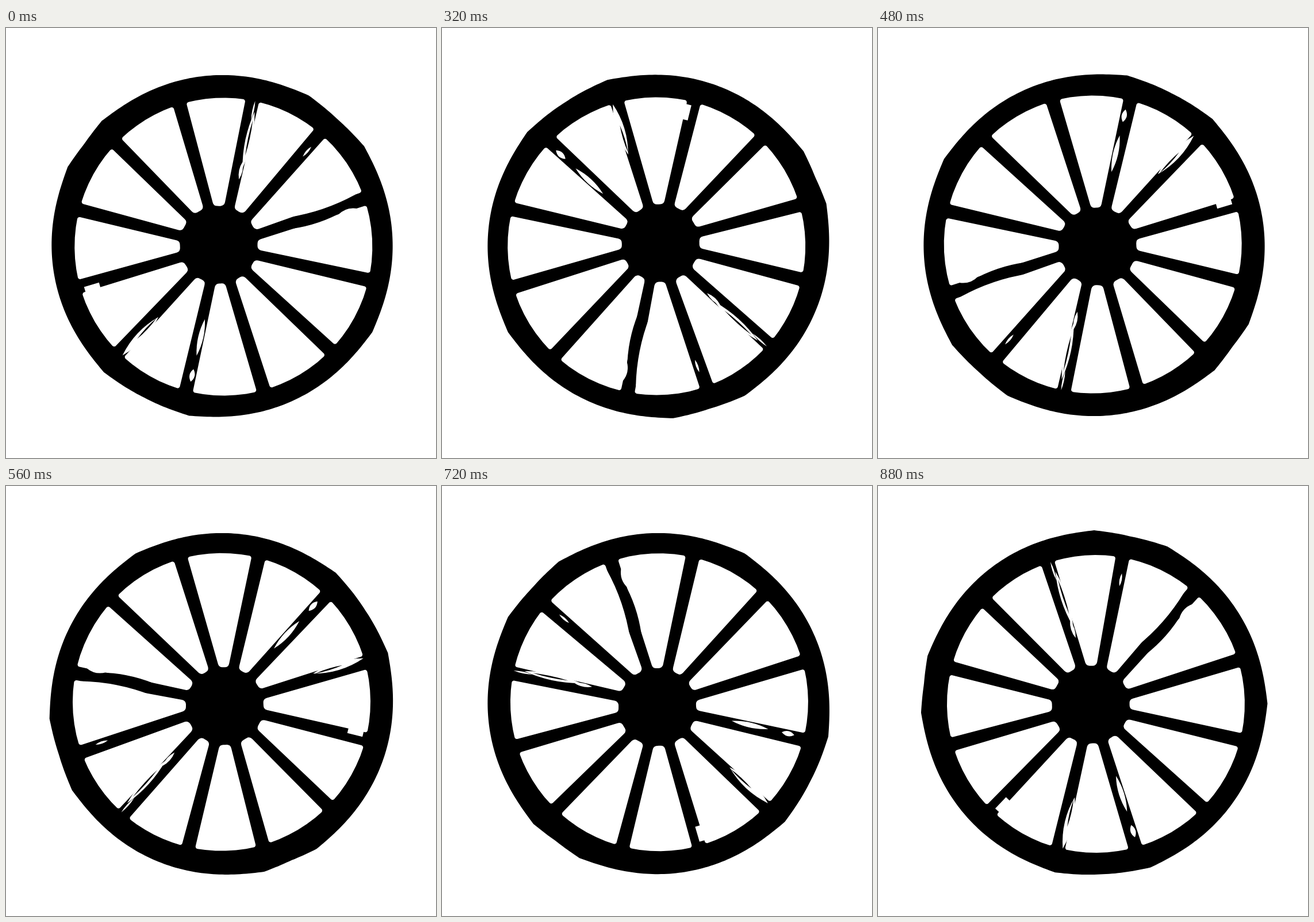
Recreate the animation shown at these times as an HTML page with a canvas. Size 748 px wide and 748 px high, loop 0.96 s.

```html
<!DOCTYPE html>
<html lang="en">
<head>
<meta charset="utf-8">
<title>Wheel</title>
<style>
  html, body { margin: 0; height: 100%; overflow: hidden; background: #fff; }
  canvas { display: block; width: 100vw; height: 100vh; }
</style>
</head>
<body>
<canvas id="stage" width="748" height="748"></canvas>
<script>
const SIZE = 748;
const SPOKES = 12;
const PITCH = 360 / SPOKES;
const STEP_MS = 80;

const AXLE = { x: 376, y: 378.5 };
const HUB = { x: 370, y: 377, radius: 68 };
const RIM_CORNERS = [30, 55, 120, 191, 223, 297, 316];

// The wheel hops off its axle once per turn.
const HOP = { step: 8, x: 3.5, y: -2 };

const BLACK = "#000", WHITE = "#fff";

const ctx = document.getElementById("stage").getContext("2d");

// Angles are in degrees, clockwise from the top.
const sin = a => Math.sin(a * Math.PI / 180);
const cos = a => Math.cos(a * Math.PI / 180);
const polar = (center, radius, a) =>
  ({ x: center.x + radius * sin(a), y: center.y - radius * cos(a) });

function rimOuter(a) {
  const peaks = RIM_CORNERS.map(corner => {
    const apart = Math.abs((a - corner + 540) % 360 - 180);
    return Math.exp(-apart / 8);
  });
  return 296.5 + 5 * Math.max(...peaks);
}

const rimInner = a => 259 + 3 * cos(a - 130);

// Spokes lean a little where the hub sits off centre.
const footAngle = i => 14 + PITCH * i + 2 * cos(PITCH * (i - 1));
const tipAngle = i =>
  14 + PITCH * i - 3 * Math.max(0, cos(PITCH * (i - 1))) ** 2;

function rimPath() {
  const path = new Path2D();
  for (let a = 0; a < 360; a++) {
    const p = polar(AXLE, rimOuter(a), a);
    path.lineTo(p.x, p.y);
  }
  path.closePath();
  return path;
}

// A white opening between spoke i and the next one.
function gapPath(i) {
  const foot = a => polar(HUB, HUB.radius, a);
  const tip = a => polar(AXLE, rimInner(a), a);
  const from = tipAngle(i) + 2.65;
  const to = tipAngle(i + 1) - 2.65;
  const footLeft = foot(footAngle(i) + 7.6);
  const footRight = foot(footAngle(i + 1) - 7.6);
  const arc = Array.from({ length: 7 }, (_, k) => tip(from + (to - from) * k / 6));
  const path = new Path2D();
  const round = (corner, next, radius) =>
    path.arcTo(corner.x, corner.y, next.x, next.y, radius);

  path.moveTo((footLeft.x + footRight.x) / 2, (footLeft.y + footRight.y) / 2);
  round(footLeft, arc[0], 8);
  round(arc[0], arc[1], 4);
  arc.slice(1, -1).forEach(p => path.lineTo(p.x, p.y));
  round(arc[6], footRight, 4);
  round(footRight, footLeft, 8);
  path.closePath();
  return path;
}

// Point at a fraction of a spoke's length, moved sideways (clockwise) in pixels.
function onSpoke(i, along, side) {
  const foot = polar(HUB, 72, footAngle(i));
  const tip = polar(AXLE, 258, tipAngle(i));
  const dx = tip.x - foot.x, dy = tip.y - foot.y;
  const length = Math.hypot(dx, dy);
  return {
    x: foot.x + dx * along - dy / length * side,
    y: foot.y + dy * along + dx / length * side
  };
}

// A lens-shaped scratch or bulge along a spoke.
function sliver(color, spoke, from, to, side, width) {
  const middle = (from + to) / 2;
  const a = onSpoke(spoke, from, side);
  const b = onSpoke(spoke, to, side);
  const left = onSpoke(spoke, middle, side - width);
  const right = onSpoke(spoke, middle, side + width);
  const path = new Path2D();
  path.moveTo(a.x, a.y);
  path.quadraticCurveTo(left.x, left.y, b.x, b.y);
  path.quadraticCurveTo(right.x, right.y, a.x, a.y);
  return { color, path };
}

function notch(spoke, from, to, side, width) {
  const path = new Path2D();
  const half = width / 2;
  [[from, -half], [to, -half], [to, half], [from, half]].forEach(([along, shift]) => {
    const p = onSpoke(spoke, along, side + shift);
    path.lineTo(p.x, p.y);
  });
  return { color: WHITE, path };
}

const shapes = [
  { color: BLACK, path: rimPath() },
  ...Array.from({ length: SPOKES }, (_, i) => ({ color: WHITE, path: gapPath(i) })),
  // split spoke
  sliver(WHITE, 0, 0.25, 0.42, 6, 6),
  sliver(WHITE, 0, 0.36, 0.9, 8, 11),
  sliver(WHITE, 0, 0.82, 1, 5, 3),
  sliver(BLACK, 0, 0.48, 0.82, 8, 3),
  // nick
  sliver(WHITE, 1, 0.74, 0.86, 4, 4),
  // knotted spoke
  sliver(BLACK, 2, 0.3, 0.8, 9, 9),
  sliver(WHITE, 2, 0.3, 0.95, -12, 11),
  sliver(WHITE, 2, 0.74, 0.92, 12, 9),
  // chips
  sliver(WHITE, 6, 0.32, 0.67, -4.5, 9),
  sliver(WHITE, 6, 0.8, 0.92, -4.5, 9),
  // splintered edge
  sliver(WHITE, 7, 0.5, 1, -8, 14),
  sliver(BLACK, 7, 0.52, 0.79, -7, 3),
  notch(8, 0.81, 0.96, -8, 10)
];

function draw(time) {
  const step = Math.floor(time / STEP_MS) % SPOKES;
  const hop = step === HOP.step ? HOP : { x: 0, y: 0 };
  ctx.fillStyle = WHITE;
  ctx.fillRect(0, 0, SIZE, SIZE);
  ctx.save();
  ctx.translate(AXLE.x + hop.x, AXLE.y + hop.y);
  ctx.rotate(step * 2 * Math.PI / SPOKES);
  ctx.translate(-AXLE.x, -AXLE.y);
  for (const { color, path } of shapes) {
    ctx.fillStyle = color;
    ctx.fill(path);
  }
  ctx.restore();
}

const start = performance.now();
function tick() {
  draw(performance.now() - start);
  requestAnimationFrame(tick);
}
tick();
</script>
</body>
</html>
```
